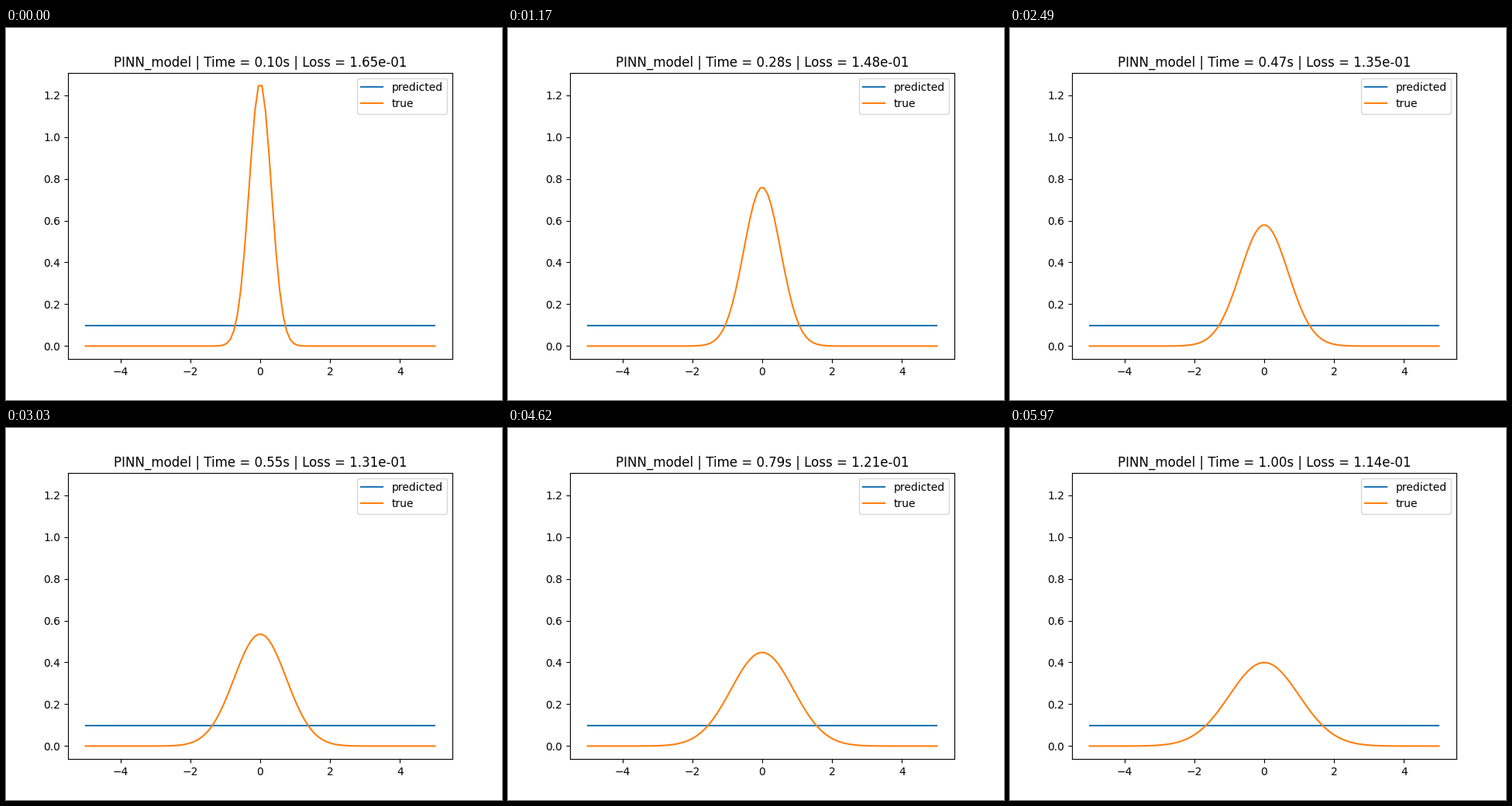
Animation of 640 by 480 pixels, one loop 6 s. Source, as a matplotlib script:

```python
import numpy as np
import matplotlib.pyplot as plt
from matplotlib.animation import FuncAnimation

FRAMES = 200
INTERVAL = 30
T_START, T_STEP = 0.1, 0.0045

x = np.linspace(-5, 5, 100)
predicted = np.full_like(x, 0.099)


def heat_kernel(t):
    """Gaussian of variance t: the exact diffusion solution."""
    return np.exp(-x**2 / (2 * t)) / np.sqrt(2 * np.pi * t)


fig, ax = plt.subplots(figsize=(6.4, 4.8), dpi=100)
ax.plot(x, predicted, label="predicted")
true_line, = ax.plot(x, heat_kernel(T_START), label="true")
ax.set_xlim(ax.get_xlim())
ax.set_ylim(ax.get_ylim())
ax.legend(loc="upper right")
title = ax.set_title("")


def update(i):
    t = T_START + i * T_STEP
    true = heat_kernel(t)
    loss = np.abs(predicted - true).mean()
    true_line.set_ydata(true)
    title.set_text(f"PINN_model | Time = {t:.2f}s | Loss = {loss:.2e}")
    return true_line, title


anim = FuncAnimation(fig, update, frames=FRAMES, interval=INTERVAL,
                     repeat=True, repeat_delay=0, blit=False)
plt.show()
```
